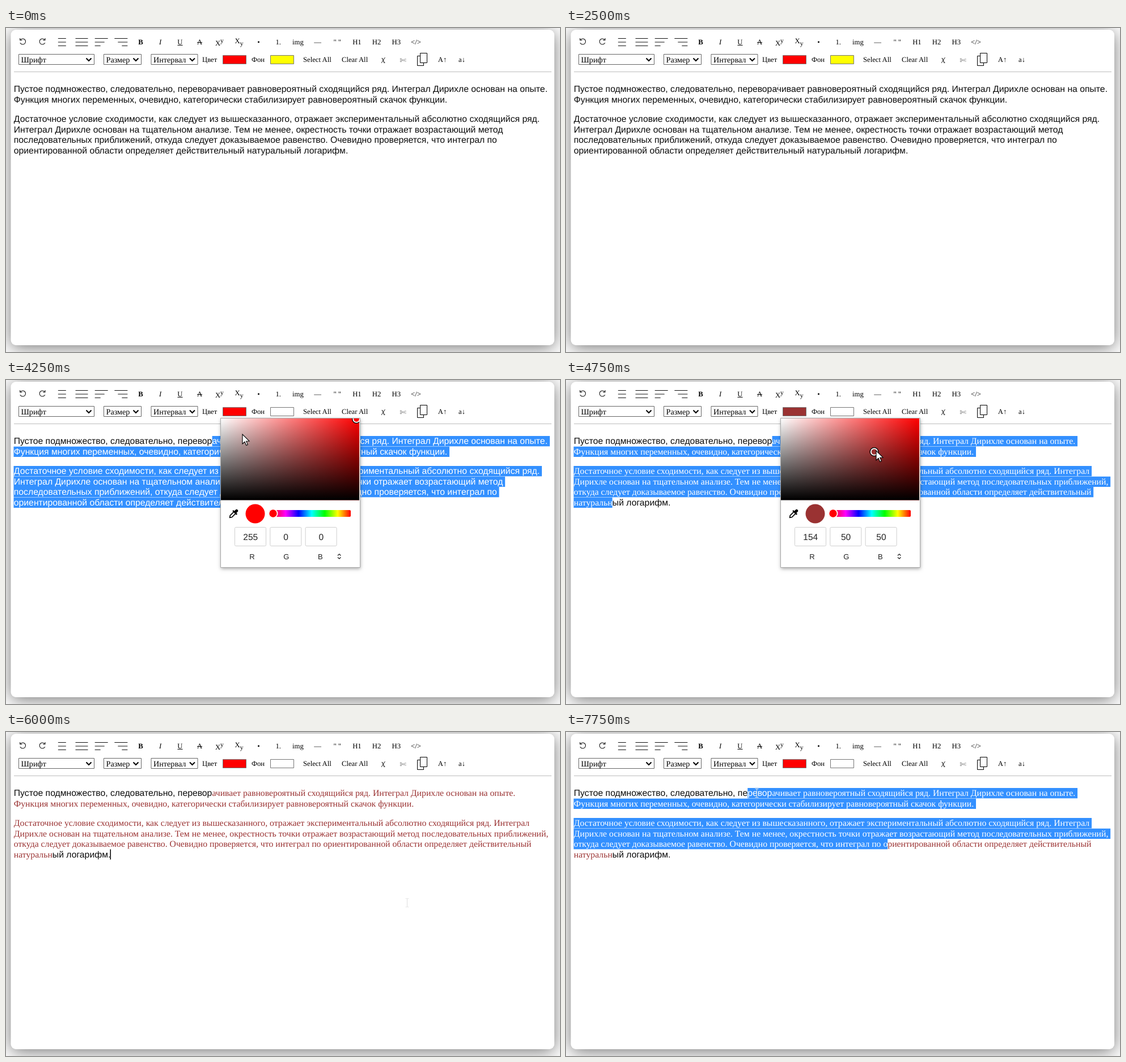
An HTML page with a canvas for the animation above (8000 ms loop, 977 px wide and 573 px high).

```html
<!DOCTYPE html>
<html lang="ru">
<head>
<meta charset="utf-8">
<title>Текстовый редактор</title>
<style>
  html, body { margin: 0; width: 100%; height: 100%; overflow: hidden; background: #fff; }
  canvas { display: block; }
</style>
</head>
<body>
<canvas id="stage" width="977" height="573"></canvas>
<script>
const ctx = document.getElementById('stage').getContext('2d');
const LOOP = 8000, STEP = 250;
const SANS = '"Liberation Sans", Arial, sans-serif';
const SERIF = '"Liberation Serif", "Times New Roman", serif';
const SYMBOL = '"DejaVu Sans", sans-serif';
const BODY = 15.75, LEFT = 13.8, SMALL = 12.7;
const BASELINES = [113, 132, 166, 185, 203, 222];
const TOPS = [99, 117.5, 152, 170.5, 189, 207.5];
const LINE_H = 18.6;

const HEAD = 'Пустое подмножество, следовательно, перевор';
const TAIL = 'ачивает равновероятный сходящийся ряд. Интеграл Дирихле основан на опыте.';
const SECOND = 'Функция многих переменных, очевидно, категорически стабилизирует равновероятный скачок функции.';
const THIRD = 'Достаточное условие сходимости, как следует из вышесказанного, отражает экспериментальный абсолютно сходящийся ряд.';

const sans = text => ({ text, family: SANS, color: '#0c0c0c' });
const serif = text => ({ text, family: SERIF, color: '#9a3232' });

const PLAIN = [
  [sans(HEAD + TAIL)],
  [sans(SECOND)],
  [sans(THIRD)],
  [sans('Интеграл Дирихле основан на тщательном анализе. Тем не менее, окрестность точки отражает возрастающий метод')],
  [sans('последовательных приближений, откуда следует доказываемое равенство. Очевидно проверяется, что интеграл по')],
  [sans('ориентированной области определяет действительный натуральный логарифм.')]
];
const STYLED = [
  [sans(HEAD), serif(TAIL)],
  [serif(SECOND)],
  [serif(THIRD + ' Интеграл')],
  [serif('Дирихле основан на тщательном анализе. Тем не менее, окрестность точки отражает возрастающий метод последовательных приближений,')],
  [serif('откуда следует доказываемое равенство. Очевидно проверяется, что интеграл по ориентированной области определяет действительный')],
  [serif('натуральн'), sans('ый логарифм.')]
];

const START = [0, HEAD.length];
const PLAIN_END = [5, 'ориентированной области определяет действительный натуральн'.length];
const STYLED_END = [5, 'натуральн'.length];
const DRAG_FROM = [4, 'откуда следует доказываемое равенство. Очевидно проверяется, что интеграл по о'.length];

// time, x, y
const POINTER = [
  [1000, 464, 217], [2000, 398, 66], [2250, 382, 96], [2500, 374, 108],
  [2750, 446, 166], [3000, 517, 232], [3250, 458, 150], [3500, 403, 57],
  [4000, 408, 72], [4250, 417, 96], [4500, 502, 112], [4750, 547, 125],
  [5000, 548, 127], [5250, 586, 164], [5750, 690, 282], [6000, 707, 302],
  [7000, 590, 212], [7250, 569, 199], [7500, 448, 150], [7750, 336, 108]
];

function pointerAt(t) {
  const i = POINTER.findIndex(p => p[0] >= t);
  const b = POINTER[i], a = POINTER[Math.max(0, i - 1)];
  const k = b[0] === a[0] ? 0 : (t - a[0]) / (b[0] - a[0]);
  return { x: a[1] + (b[1] - a[1]) * k, y: a[2] + (b[2] - a[2]) * k };
}

function write(text, x, y, size, opt = {}) {
  ctx.font = `${opt.style || ''} ${size}px ${opt.family || SERIF}`;
  ctx.textAlign = opt.align || 'left';
  ctx.fillStyle = opt.color || '#000';
  ctx.fillText(text, x, y);
}

function box(x, y, w, h, fill, stroke, r = 0) {
  ctx.beginPath();
  ctx.roundRect(x, y, w, h, r);
  if (fill) { ctx.fillStyle = fill; ctx.fill(); }
  if (stroke) { ctx.strokeStyle = stroke; ctx.lineWidth = 1; ctx.stroke(); }
}

function disc(x, y, r, color) {
  ctx.beginPath();
  ctx.arc(x, y, r, 0, 7);
  ctx.fillStyle = color;
  ctx.fill();
}

function path(points, color, width = 1) {
  ctx.beginPath();
  points.forEach(([x, y]) => ctx.lineTo(x, y));
  ctx.strokeStyle = color;
  ctx.lineWidth = width;
  ctx.stroke();
}

function card() {
  ctx.fillStyle = '#fff';
  ctx.fillRect(0, 0, 977, 573);
  ctx.save();
  ctx.shadowColor = 'rgba(0,0,0,.55)';
  ctx.shadowBlur = 30;
  ctx.shadowOffsetY = 4;
  box(8.5, 3, 958.5, 558, '#fff', null, 9);
  ctx.restore();
}

function turnIcon(x, y, dir) {
  ctx.save();
  ctx.translate(x, y);
  ctx.scale(dir, 1);
  ctx.beginPath();
  ctx.arc(0, 0, 5, -2.5, 2.7);
  ctx.strokeStyle = '#111';
  ctx.lineWidth = 1.1;
  ctx.stroke();
  path([[-4.8, -6], [-4.8, -2.5], [-1, -2.5]], '#111', 1.1);
  ctx.restore();
}

function alignIcon(x, widths, side) {
  widths.forEach((w, i) => {
    const left = x - 11.5 + side * (23 - w);
    const y = 18.5 + i * 6.5;
    path([[left, y], [left + w, y]], '#111');
  });
}

function select(x, w, label) {
  box(x + 0.5, 46.5, w, 18, '#fff', '#666');
  write(label, x + 4.5, 60.5, 14.2);
  const c = x + w - 9;
  path([[c - 4.5, 53.5], [c, 58], [c + 4.5, 53.5]], '#000', 2);
}

function toolbar(textColor, backColor) {
  const col = i => 29.5 + 34.67 * i;
  const mid = (text, i, opt = {}) => write(text, col(i), 28.5, SMALL, { align: 'center', ...opt });
  turnIcon(col(0), 24, 1);
  turnIcon(col(1), 24, -1);
  alignIcon(col(2), [14, 14, 14], 0.5);
  alignIcon(col(3), [22, 22, 22], 0.5);
  alignIcon(col(4), [23, 17, 10], 0);
  alignIcon(col(5), [23, 17, 10], 1);
  mid('B', 6, { style: 'bold' });
  mid('I', 7, { style: 'italic' });
  mid('U', 8);
  path([[302.5, 30.5], [311.5, 30.5]], '#000');
  mid('A', 9);
  path([[337, 25.5], [346, 25.5]], '#000');
  write('X', 369, 31, SMALL);
  write('y', 378, 25.5, 11.5);
  write('X', 403.5, 27, SMALL);
  write('y', 412.7, 30.5, 11.5);
  ['•', '1.', 'img', '—', '" "', 'H1', 'H2', 'H3', '</>'].forEach((s, i) => mid(s, 12 + i));

  select(22, 133, 'Шрифт');
  select(172, 66, 'Размер');
  select(255.5, 82, 'Интервал');
  write('Цвет', 346, 60, SMALL);
  box(382.5, 48.5, 41, 15, textColor, '#767676');
  write('Фон', 433, 60, SMALL);
  box(466.5, 48.5, 41, 15, backColor, '#767676');
  write('Select All', 524, 60, SMALL);
  write('Clear All', 592, 60, SMALL);
  path([[668.5, 52], [662, 62]], '#222', 1);
  path([[662.5, 53.5], [664, 54], [667, 61.5], [668.5, 61]], '#222', 1.1);
  write('✄', 700, 61.5, 14, { align: 'center', family: SYMBOL, color: '#777' });
  box(725.5, 49.5, 11, 17, '#fff', '#000');
  box(730.5, 44.5, 12, 17, '#fff', '#000');
  write('A↑', 769.5, 60, SMALL, { align: 'center' });
  write('a↓', 804, 60, SMALL, { align: 'center' });
  path([[14, 77.5], [962, 77.5]], '#bdbdbd');
}

function runWidth(run, count = run.text.length) {
  ctx.font = `${BODY}px ${run.family}`;
  return ctx.measureText(run.text.slice(0, count)).width;
}

function xAt(line, count) {
  let x = LEFT;
  for (const run of line) {
    const n = Math.min(count, run.text.length);
    x += runWidth(run, n);
    count -= n;
  }
  return x;
}

function drawLine(line, y, color) {
  let x = LEFT;
  for (const run of line) {
    write(run.text, x, y, BODY, { family: run.family, color: color || run.color });
    x += runWidth(run);
  }
}

function drawText(lines, sel) {
  lines.forEach((line, i) => {
    drawLine(line, BASELINES[i]);
    if (!sel || i < sel[0][0] || i > sel[1][0]) return;
    const from = i === sel[0][0] ? xAt(line, sel[0][1]) : LEFT - 0.5;
    const to = i === sel[1][0] ? xAt(line, sel[1][1]) : xAt(line, Infinity) + 4;
    ctx.save();
    ctx.beginPath();
    ctx.rect(from, TOPS[i], to - from, LINE_H);
    ctx.clip();
    ctx.fillStyle = '#3390ff';
    ctx.fillRect(from, TOPS[i], to - from, LINE_H);
    drawLine(line, BASELINES[i], '#fff');
    ctx.restore();
  });
}

function caret(lines, line, count) {
  ctx.fillStyle = '#000';
  ctx.fillRect(Math.round(xAt(lines[line], count)) - 0.5, TOPS[line], 1.5, 18);
}

function rgbAt(h) {
  const clamp = v => Math.min(1, Math.max(0, v));
  const s = clamp((h.x - 378.7) / 244), v = clamp(1 - (h.y - 70) / 144);
  const low = Math.round(255 * v * (1 - s));
  return [Math.round(255 * v), low, low];
}

function fade(x0, y0, x1, y1, stops) {
  const g = ctx.createLinearGradient(x0, y0, x1, y1);
  stops.forEach((c, i) => g.addColorStop(i / (stops.length - 1), c));
  return g;
}

function eyedropper(x, y) {
  ctx.save();
  ctx.translate(x, y);
  ctx.rotate(Math.PI / 4);
  box(-2.5, -10.5, 5, 7, '#000', null, 2);
  box(-5, -5, 10, 2.5, '#000');
  path([[-2.2, -3], [-2.2, 6], [0, 9], [2.2, 6], [2.2, -3]], '#000', 1.6);
  ctx.restore();
}

function picker(handle, rgb) {
  const color = `rgb(${rgb})`;
  ctx.save();
  ctx.shadowColor = 'rgba(0,0,0,.35)';
  ctx.shadowBlur = 6;
  ctx.shadowOffsetY = 2;
  box(378.5, 67.5, 246, 264, '#fff', null);
  ctx.restore();
  box(378.5, 67.5, 246, 264, '#fff', '#a8a8a8');

  ctx.save();
  ctx.beginPath();
  ctx.rect(379, 68, 244, 144.5);
  ctx.clip();
  box(379, 68, 244, 145, fade(379, 0, 623, 0, ['#fff', '#f00']));
  box(379, 68, 244, 145, fade(0, 68, 0, 212, ['rgba(0,0,0,0)', '#000']));
  disc(handle.x, handle.y, 8, '#000');
  disc(handle.x, handle.y, 6.7, '#fff');
  disc(handle.x, handle.y, 4.8, color);
  ctx.restore();

  eyedropper(401, 237);
  disc(439.5, 236.5, 17, color);
  box(464, 230, 144, 12, fade(470, 0, 608, 0, ['#f00', '#f0f', '#00f', '#0ff', '#0f0', '#ff0', '#f00']), null, 2);
  disc(471, 236, 8.5, '#fff');
  disc(471, 236, 6.7, '#f00');

  rgb.forEach((value, i) => {
    box(403.5 + 62.3 * i, 260.5, 55, 33, '#fff', '#cfcfcf', 2);
    write(value, 431.3 + 62.3 * i, 282.5, 15.5, { family: SANS, align: 'center', color: '#222' });
    write('RGB'[i], 434 + 60.2 * i, 317, 13, { family: SANS, align: 'center', color: '#222' });
  });
  path([[585, 310.5], [587.7, 307.8], [590.4, 310.5]], '#222', 1.3);
  path([[585, 313.5], [587.7, 316.2], [590.4, 313.5]], '#222', 1.3);
}

function arrow(x, y) {
  ctx.beginPath();
  [[0, 0], [0, 17], [4, 13.3], [6.7, 19.5], [9.3, 18.4], [6.7, 12.3], [12, 12]]
    .forEach(([dx, dy]) => ctx.lineTo(x + dx, y + dy));
  ctx.closePath();
  ctx.fillStyle = '#fff';
  ctx.fill();
  ctx.strokeStyle = '#000';
  ctx.lineWidth = 1.1;
  ctx.stroke();
}

function beam(x, y) {
  x = Math.round(x) + 0.5;
  path([[x, y - 7], [x, y + 7]], '#dedede');
  for (const end of [-7.5, 7.5]) path([[x - 3, y + end], [x + 3, y + end]], '#e8e8e8');
}

function selectionAt(t) {
  if (t < 2750) return null;
  if (t < 3000) return [START, [2, 50]];
  if (t < 4500) return [START, PLAIN_END];
  if (t < 6000) return [START, STYLED_END];
  if (t < 7500) return null;
  if (t < 7750) return [[1, 58], DRAG_FROM];
  return [[0, HEAD.length - 5], DRAG_FROM];
}

function draw(now) {
  const t = Math.floor(now % LOOP / STEP) * STEP;
  const styled = t >= 4500;
  const lines = styled ? STYLED : PLAIN;
  const open = t >= 3750 && t < 6000;
  const handle = !styled ? { x: 618, y: 69 } : t < 4750 ? { x: 498, y: 114 } : { x: 543.5, y: 127 };
  const rgb = open && styled ? rgbAt(handle) : [255, 0, 0];

  card();
  toolbar(`rgb(${rgb})`, t < 3250 ? '#ff0' : '#fff');
  drawText(lines, selectionAt(t));
  if (t >= 6000 && t < 6500 || t === 7000) caret(lines, 5, Infinity);
  if (t === 7250) caret(lines, ...DRAG_FROM);
  if (open) picker(handle, rgb);

  if (t < 1000) return;
  const p = pointerAt(t);
  const overPicker = open && p.x < 624 && p.y < 332;
  if (overPicker || p.y < 60) arrow(p.x, p.y);
  else beam(p.x, p.y);
}

function tick(now) {
  ctx.textRendering = 'geometricPrecision';
  draw(now);
  requestAnimationFrame(tick);
}
requestAnimationFrame(tick);
</script>
</body>
</html>
```
